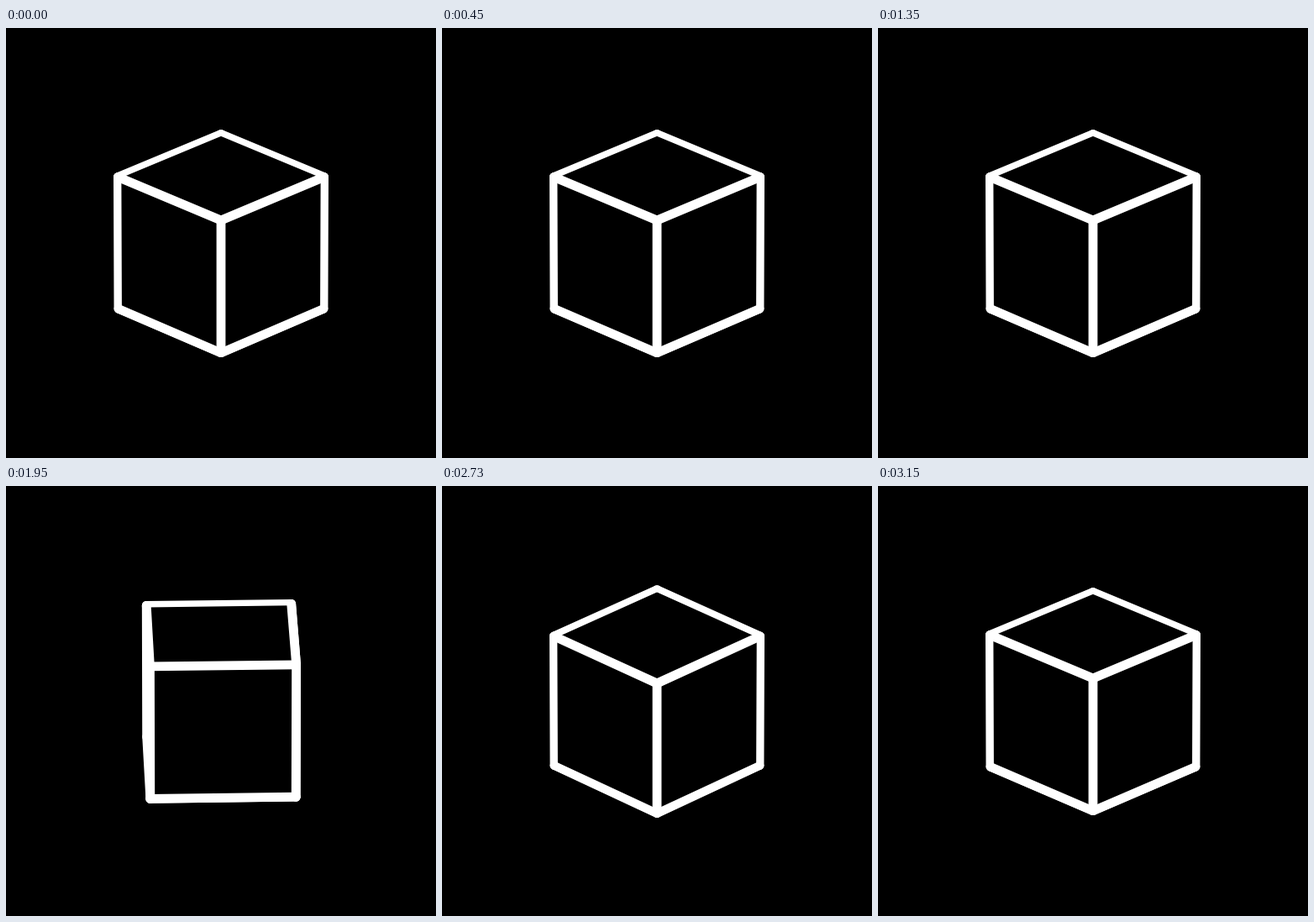
Recreate the animation shown at these times as an HTML page with a canvas. Size 512x512 px, loop 3630 ms.

```html
<!DOCTYPE html>
<html lang="en">
<head>
<meta charset="utf-8">
<title>Turning cube</title>
<style>
  html, body { margin: 0; width: 100%; height: 100%; overflow: hidden; background: #000; }
  canvas { display: block; width: 512px; height: 512px; }
</style>
</head>
<body>
<canvas id="stage" width="512" height="512"></canvas>
<script>
const ctx = document.getElementById('stage').getContext('2d');
const LOOP = 3630, STEP = 30, TURN = 450, PHASE = 900;
const MID = 256, HALF = 86.5, RADIUS = HALF * Math.SQRT2;
const TILT = 25 * Math.PI / 180;
const CAMERA = 16000;   // distance, for a very weak perspective
const WIDTH = 10.8;     // full line width
const LIFT = 4.4;       // how far the lines float in front of the faces

const ease = p => p * p * (3 - 2 * p);

// Half turns: left, up, right, down. Each ends in a pose that looks like rest.
function pose(t) {
  const a = Math.PI * ease(Math.min(1, (t % PHASE) / TURN));
  switch (Math.floor(t / PHASE)) {
    case 0: return { yaw: -a, tilt: TILT };
    case 1: return { yaw: 0, tilt: TILT - a };
    case 2: return { yaw: a, tilt: TILT };
    case 3: return { yaw: 0, tilt: TILT + a };
    default: return { yaw: 0, tilt: TILT };
  }
}

function trace(points) {
  ctx.moveTo(...points[0]);
  for (const p of points.slice(1)) ctx.lineTo(...p);
}

function strokeEdge({ a, b }, width) {
  ctx.lineWidth = width;
  ctx.beginPath();
  trace([a, b]);
  ctx.stroke();
}

// A steep face rises through the line and hides part of its inner half.
function innerWidth({ a, b, face }) {
  const [nx, ny, nz] = face.normal;
  const ex = b[0] - a[0], ey = b[1] - a[1];
  const slope = Math.abs(nx * ey - ny * ex) / (nz * Math.hypot(ex, ey));
  return Math.min(WIDTH, 2 * LIFT / slope);
}

function draw(t) {
  const { yaw, tilt } = pose(t);
  const cos = Math.cos(tilt), sin = Math.sin(tilt);
  const angle = i => yaw + i * Math.PI / 2;
  const corner = (i, h) => {
    const x = RADIUS * Math.sin(angle(i)), z = RADIUS * Math.cos(angle(i));
    const scale = CAMERA / (CAMERA - h * sin - z * cos);
    return [MID + x * scale, MID + (z * sin - h * cos) * scale];
  };
  const ring = [0, 1, 2, 3];
  const next = i => (i + 1) % 4;
  const upper = ring.map(i => corner(i, HALF));
  const lower = ring.map(i => corner(i, -HALF));

  const makeFace = (points, normal) => ({ points, normal, seen: normal[2] > 1e-6 });
  const top = makeFace(upper, [0, -cos, sin]);
  const base = makeFace(lower, [0, cos, -sin]);
  const sides = ring.map(i => {
    const n = next(i), dir = angle(i) + Math.PI / 4;
    return makeFace([upper[i], upper[n], lower[n], lower[i]],
      [Math.sin(dir), Math.cos(dir) * sin, Math.cos(dir) * cos]);
  });

  const outer = [], inner = [];
  const addEdge = (a, b, f, g) => {
    if (f.seen && g.seen) inner.push({ a, b });
    else if (f.seen || g.seen) outer.push({ a, b, face: f.seen ? f : g });
  };
  for (const i of ring) {
    const n = next(i);
    addEdge(upper[i], upper[n], sides[i], top);
    addEdge(lower[i], lower[n], sides[i], base);
    addEdge(upper[n], lower[n], sides[i], sides[n]);
  }

  ctx.fillStyle = '#000';
  ctx.fillRect(0, 0, 512, 512);
  ctx.strokeStyle = '#fff';
  ctx.lineCap = ctx.lineJoin = 'round';

  outer.forEach(e => strokeEdge(e, WIDTH));
  for (const face of [top, base, ...sides]) {
    if (!face.seen) continue;
    ctx.beginPath();
    trace(face.points);
    ctx.closePath();
    ctx.fill();
  }
  outer.forEach(e => strokeEdge(e, innerWidth(e)));
  inner.forEach(e => strokeEdge(e, WIDTH));
}

const start = performance.now();
function tick() {
  const t = (performance.now() - start) % LOOP;
  draw(Math.floor(t / STEP) * STEP);
  requestAnimationFrame(tick);
}
tick();
</script>
</body>
</html>
```
